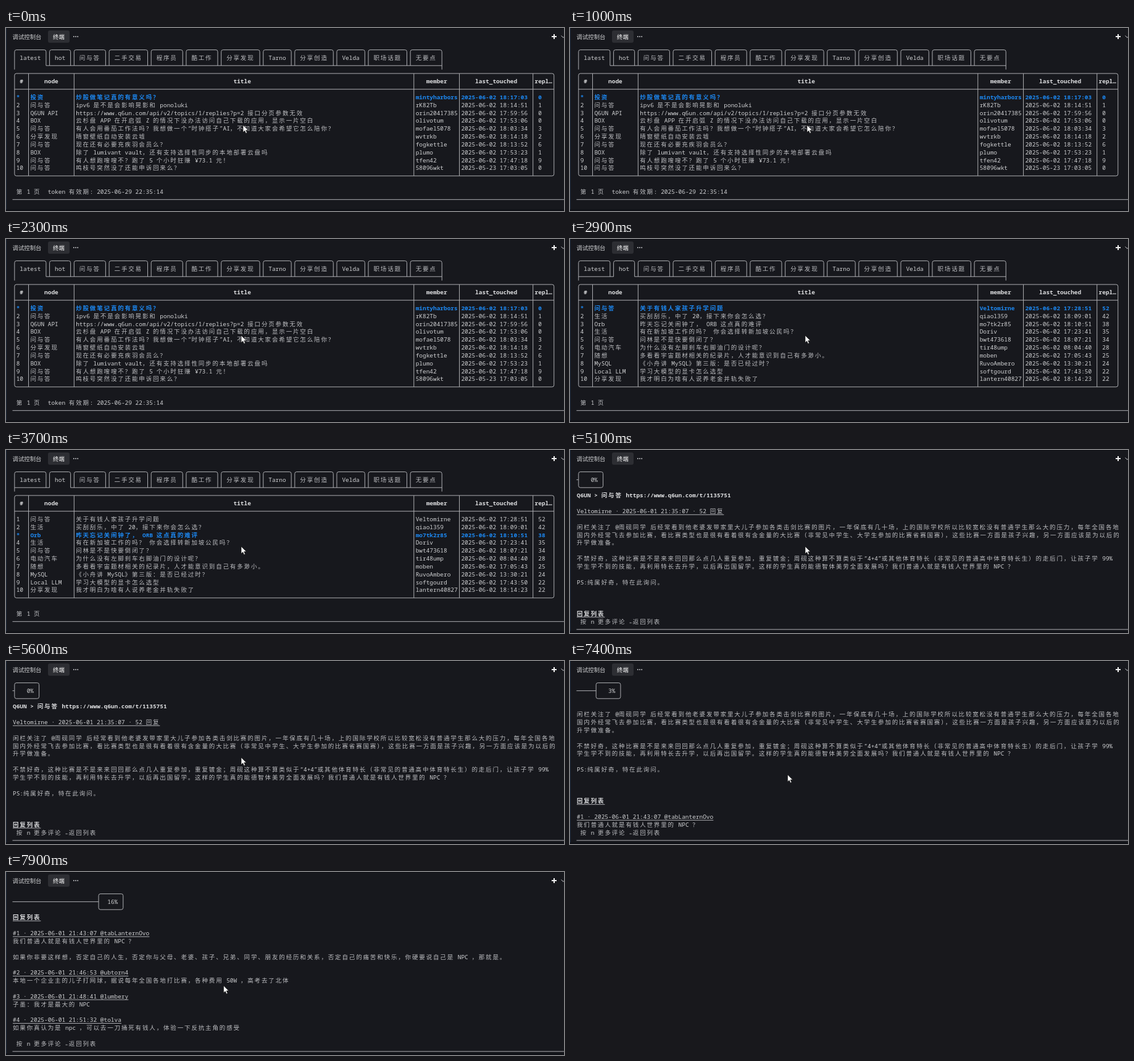
These frames come from a looping animation (904x298 px, 8000 ms). An HTML page:

```html
<!DOCTYPE html>
<html lang="zh-CN">
<head>
<meta charset="utf-8">
<style>
html, body { margin: 0; width: 100%; height: 100%; overflow: hidden; background: #17181d; }
svg { display: block; width: 904px; height: 298px; }
text { white-space: pre; fill: #cfd0d2; font: 500 9.46px "Noto Sans Mono", "DejaVu Sans Mono", monospace; }
text.wide { font: 9.5px "Noto Sans CJK SC", "Noto Sans CJK", sans-serif; letter-spacing: 1.85px; fill: #bcbdc0; }
text.bold { font-weight: 700; fill: #dcdddf; }
text.active { font-weight: 700; fill: #1c88f2; }
text.ui { font: 9.4px "Noto Sans CJK SC", "Noto Sans CJK", sans-serif; }
.line { fill: none; stroke: #adaeb2; stroke-width: 1; }
</style>
</head>
<body>
<svg viewBox="0 0 904 298">
  <rect width="904" height="298" fill="#17181d"/>
  <rect width="904" height="1" fill="#0d0e13"/>
  <rect width="1" height="298" fill="#1d2a3c"/>
  <rect y="295.5" width="904" height="2.5" fill="#0f1016"/>
  <text class="ui" x="10.5" y="17.6">调试控制台</text>
  <rect x="68" y="4" width="35" height="20" rx="3" fill="#2d2e33"/>
  <text class="ui" x="76" y="17.6" style="fill:#fff">终端</text>
  <g fill="#cdced1"><circle cx="109.8" cy="14" r=".9"/><circle cx="113" cy="14" r=".9"/><circle cx="116.2" cy="14" r=".9"/></g>
  <path d="M884 14h8M888 10v8" stroke="#f2f2f2" stroke-width="2"/>
  <path d="M899.5 12.5l3.2 3.2 3.2-3.2" stroke="#cdced1" fill="none"/>
  <g id="screen"></g>
  <path id="cursor" d="M0 0V11.8L2.7 9.3L4.6 13.4L6.6 12.5L4.7 8.6H8.4Z" fill="#fff" stroke="#111" stroke-width=".7"/>
</svg>
<script>
const CELL = 5.675, LEFT = 11, PITCH = 12.83, LOOP = 8000;
const colX = c => LEFT + c * CELL;
const midX = c => colX(c + 0.5);
const rowY = r => 48.4 + r * PITCH;
const screen = document.getElementById('screen');
const cursor = document.getElementById('cursor');

const path = d => `<path class="line" d="${d}"/>`;
const hLine = (x1, x2, y) => path(`M${x1} ${y}H${x2}`);
const vLine = (x, y1, y2) => path(`M${x} ${y1}V${y2}`);
const isWide = s => /[\u2e80-\uffef]/.test(s);
const cells = s => [...s].reduce((n, ch) => n + (isWide(ch) ? 2 : 1), 0);

// Terminal text: wide characters take two cells, others one.
function put(col, row, str, style = '') {
  let out = '';
  for (const run of str.match(/[\u2e80-\uffef]+|[^\u2e80-\uffef]+/g) || []) {
    const cls = (isWide(run) ? 'wide ' : '') + style;
    out += `<text class="${cls}" x="${colX(col)}" y="${rowY(row) + 3.4}">${run}</text>`;
    col += cells(run);
  }
  return out;
}

const tabs = ['latest', 'hot', '问与答', '二手交易', '程序员', '酷工作', '分享发现',
  'Tarno', '分享创造', 'Velda', '职场话题', '无要点'];

const parse = block => block.trim().split('\n').map(l => l.split('|'));
const lists = [parse(`
投资|炒股做笔记真的有意义吗？|mintyharbors|06-02 18:17:03|0
问与答|ipv6 是不是会影响晃影和 ponoluki|rK82Tb|06-02 18:14:51|1
Q6UN API|https://www.q6un.com/api/v2/topics/1/replies?p=2 接口分页参数无效|orin20417385|06-02 17:59:56|0
BOX|云杉盘 APP 在开启弧 Z 的情况下没办法访问自己下载的应用，显示一片空白|olivotum|06-02 17:53:06|0
问与答|有人会用番茄工作法吗？我想做一个“时钟搭子”AI，不知道大家会希望它怎么陪你？|mofael5078|06-02 18:03:34|3
分享发现|晴窗壁纸自动安装云墟|wvtrkb|06-02 18:14:18|2
问与答|现在还有必要充疾羽会员么？|fogkettle|06-02 18:13:52|6
BOX|除了 lumivant vault，还有支持选择性同步的本地部署云盘吗|plumo|06-02 17:53:23|1
问与答|有人想跑嗖嗖不？跑了 5 个小时狂赚 ¥73.1 元！|tfen42|06-02 17:47:18|9
问与答|鸣枝号突然没了还能申诉回来么？|58096wkt|05-23 17:03:05|0`), parse(`
问与答|关于有钱人家孩子升学问题|Veltomirne|06-02 17:28:51|52
生活|买刮刮乐，中了 20，接下来你会怎么选？|qiaol359|06-02 18:09:01|42
Orb|昨天忘记关闹钟了， ORB 这点真的难评|mo7tk2r85|06-02 18:10:51|38
生活|有在新加坡工作的吗？ 你会选择转新加坡公民吗？|Doriv|06-02 17:23:41|35
问与答|问林是不是快要倒闭了？|bwt473618|06-02 18:07:21|34
电动汽车|为什么没有左脚刹车右脚油门的设计呢？|tir48ump|06-02 08:04:40|28
随想|多看看宇宙题材相关的纪录片，人才能意识到自己有多渺小。|moben|06-02 17:05:43|25
MySQL|《小舟讲 MySQL》第三版：是否已经过时？|RuvoAmbero|06-02 13:30:21|24
Local LLM|学习大模型的显卡怎么选型|softgourd|06-02 17:43:50|22
分享发现|我才明白为啥有人说养老金并轨失败了|lantern40827|06-02 18:14:23|22`)];

// Leading "_" marks underlined lines, "*" bold ones.
const post = `*Q6UN > 问与答 https://www.q6un.com/t/1135751

_Veltomirne · 2025-06-01 21:35:07 · 52 回复

闲栏关注了 @周砚同学 后经常看到他老婆发带家里大儿子参加各类击剑比赛的图片，一年保底有几十场，上的国际学校所以比较宽松没有普通学生那么大的压力，每年全国各地
国内外经常飞去参加比赛，看比赛类型也是很有看着很有含金量的大比赛（非常见中学生、大学生参加的比赛省赛国赛），这些比赛一方面是孩子兴趣，另一方面应该是为以后的
升学做准备。

不禁好奇，这种比赛是不是来来回回那么点几人重复参加，重复镀金；周砚这种算不算类似于“4+4”或其他体育特长（非常见的普通高中体育特长生）的走后门，让孩子学 99%
学生学不到的技能，再利用特长去升学，以后再出国留学。这样的学生真的能德智体美劳全面发展吗？我们普通人就是有钱人世界里的 NPC ？

PS:纯属好奇，特在此询问。



_*回复列表

_#1 · 2025-06-01 21:43:07 @tabLanternOvo
我们普通人就是有钱人世界里的 NPC ？

如果你非要这样想，否定自己的人生，否定你与父母、老婆、孩子、兄弟、同学、朋友的经历和关系，否定自己的痛苦和快乐，你硬要说自己是 NPC ，那就是。

_#2 · 2025-06-01 21:46:53 @ubtorn4
本地一个企业主的儿子打网球，据说每年全国各地打比赛，各种费用 50W ，高考去了北体

_#3 · 2025-06-01 21:48:41 @lumbery
子墨：我才是最大的 NPC

_#4 · 2025-06-01 21:51:32 @tolva
如果你真认为是 npc ，可以去一刀捅死有钱人，体验一下反抗主角的感受
`.split('\n');

function drawTabs(active) {
  const top = rowY(-1), base = rowY(1), foot = base + PITCH / 2;
  let out = '', col = 0;
  tabs.forEach((name, i) => {
    const end = col + cells(name) + 3, a = midX(col), b = midX(end);
    const last = i === tabs.length - 1;
    out += path(`M${a} ${i ? base : foot}V${top + 3}q0-3 3-3H${b - 3}q3 0 3 3V${last ? foot : base}`);
    if (i !== active) out += hLine(a, last ? b : b + CELL, base);
    else if (!last) out += hLine(b, b + CELL, base);
    out += put(col + 2, 0, name);
    col = end + 1;
  });
  return out;
}

function drawList(tab, selected) {
  const x1 = midX(0), x2 = midX(154), y1 = rowY(2), y2 = rowY(15);
  let out = drawTabs(tab);
  out += `<rect class="line" x="${x1}" y="${y1}" width="${x2 - x1}" height="${y2 - y1}" rx="3"/>`;
  out += hLine(x1, x2, rowY(4));
  for (const c of [4, 17, 114, 127, 148]) out += vLine(midX(c), y1, y2);
  const heads = { 2: '#', 9: 'node', 63: 'title', 118: 'member', 132: 'last_touched', 149: 'repl…' };
  for (const c in heads) out += put(+c, 3, heads[c], 'bold');
  lists[tab].forEach(([node, title, member, date, replies], i) => {
    const on = i + 1 === selected, style = on ? 'active' : '', row = i + 5;
    out += put(1, row, on ? '*' : `${i + 1}`, style) + put(5, row, node, style)
      + put(18, row, title, style) + put(115, row, member, style)
      + put(128, row, '2025-' + date, style) + put(150, row, replies, style);
  });
  out += put(1, 17, '第 1 页' + (tab ? '' : '  token 有效期: 2025-06-29 22:35:14'));
  return out + hLine(LEFT - 0.5, 904, rowY(18));
}

function drawPost(ticks) {
  const percent = 3.2 * ticks, box = Math.round(1.49 * percent), x = midX(box);
  let out = hLine(LEFT - 0.5, x, rowY(0));
  out += `<rect class="line" x="${x}" y="${rowY(-1)}" width="${7 * CELL}" height="${2 * PITCH}" rx="3"/>`;
  out += put(box + 2, 0, `${Math.round(percent)}%`.padStart(4));
  post.slice(3 * ticks, 3 * ticks + 16).forEach((raw, i) => {
    const line = raw.replace(/^_?\*?/, ''), mark = raw.slice(0, raw.length - line.length);
    out += put(0, i + 2, line, mark.includes('*') ? 'bold' : '');
    if (mark.includes('_')) out += hLine(LEFT, colX(cells(line)), rowY(i + 2) + 5.6);
  });
  out += put(1, 18, '按 n 更多评论 ←返回列表');
  return out + hLine(LEFT - 0.5, 904, rowY(19));
}

// [start ms, view, argument]: list views take a selected row, the post takes wheel ticks.
const steps = [
  [0, 'latest', 1], [2900, 'hot', 1], [3400, 'hot', 2], [3700, 'hot', 3], [3900, 'hot', 4],
  [4300, 'hot', 3], [4600, 'hot', 2], [4800, 'hot', 1], [5100, 'post', 0],
  [7400, 'post', 1], [7500, 'post', 2], [7600, 'post', 3], [7800, 'post', 4], [7900, 'post', 5]
];
const pointer = [[0, 384, 158], [1900, 384, 158], [2200, 381, 157], [6000, 381, 157], [6400, 352.5, 185], [LOOP, 352.5, 185]];

function pointerAt(t) {
  const i = pointer.findIndex(p => p[0] > t), [t0, x0, y0] = pointer[i - 1], [t1, x1, y1] = pointer[i];
  const k = (t - t0) / (t1 - t0), e = k * k * (3 - 2 * k);
  return [x0 + (x1 - x0) * e, y0 + (y1 - y0) * e];
}

const origin = performance.now();
let shown = null;
function render() {
  const t = Math.max(0, performance.now() - origin) % LOOP;
  const step = steps.filter(s => s[0] <= t).pop();
  if (step !== shown) {
    const [, view, arg] = shown = step;
    screen.innerHTML = view === 'post' ? drawPost(arg) : drawList(tabs.indexOf(view), arg);
  }
  cursor.setAttribute('transform', `translate(${pointerAt(t)})`);
  requestAnimationFrame(render);
}
render();
</script>
</body>
</html>
```
